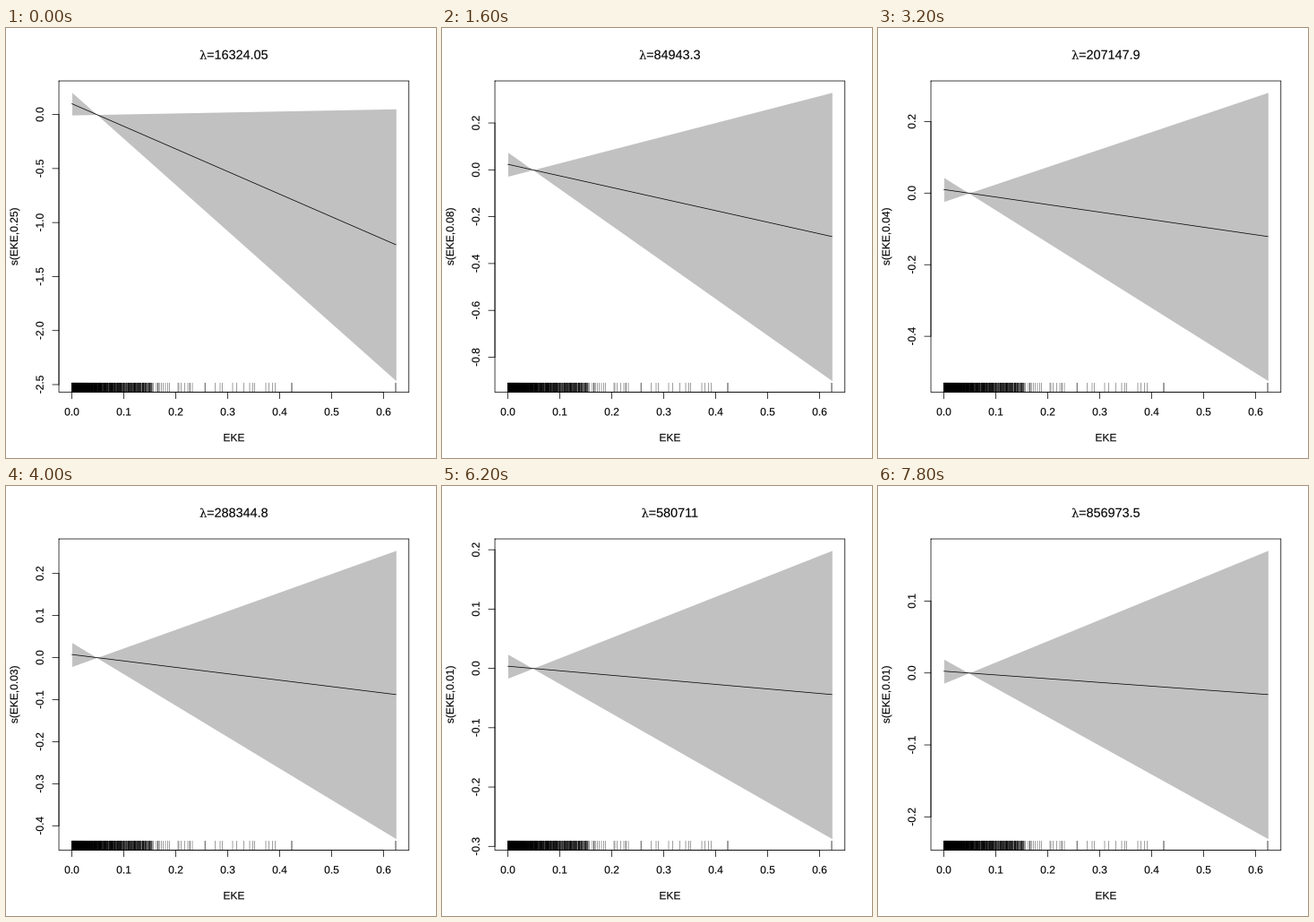
These frames come from a looping animation (480x480 px, 8000 ms). A matplotlib script:

```python
import math

import matplotlib.pyplot as plt
import numpy as np
from matplotlib.animation import FuncAnimation
from matplotlib.patches import PathPatch
from matplotlib.textpath import TextPath
from matplotlib.transforms import Affine2D

SIZE, DPI = 480, 100
FRAMES, INTERVAL = 40, 200
PX = 72 / DPI                       # points per pixel
STROKE = 0.75                       # line width in pixels
LINE = 14.4                         # height of one margin line
LEFT, RIGHT, TOP, BOTTOM = 59.04, 449.76, 59.04, 406.56
MID_X, MID_Y = (LEFT + RIGHT) / 2, (TOP + BOTTOM) / 2
X0, X1 = 73.51, 435.29              # data range inside the box
Y0, Y1 = 71.91, 393.69
X_UNIT = 580
PIVOT = 0.083                       # left / right distance from the zero point

plt.rcParams["path.snap"] = False
fig = plt.figure(figsize=(SIZE / DPI, SIZE / DPI), dpi=DPI, facecolor="white")
ax = fig.add_axes([0, 0, 1, 1])


def make_rug():
    rng = np.random.default_rng(4)
    dense = np.minimum(rng.exponential(17, 650), 96)
    middle = rng.triangular(10, 50, 94, 150)
    cluster = rng.uniform(68, 91, 35)
    sparse = [170, 171.5, 173.5, 175.5, 178, 180.5, 182.5, 192, 193, 195.5,
              199.5, 203, 205, 205.5, 208, 222, 222.3, 233.5, 239, 241.5,
              253, 257.5, 265.5, 272, 275.5, 277.5, 290, 293.5, 297.5,
              300.5, 318.8, 319.2, 434.7, 435.3]
    return np.concatenate([X0 + dense, X0 + middle, X0 + cluster, sparse])


RUG = make_rug()


def line(xs, ys):
    ax.plot(xs, ys, color="black", lw=STROKE * PX,
            solid_capstyle="round", solid_joinstyle="round")


def label(x, y, s, size=12, angle=0, family="Liberation Sans"):
    """Text centred on x, with its baseline through (x, y)."""
    path = TextPath((0, 0), s, size=size, prop={"family": family})
    width = text_width(s, size, family)
    place = Affine2D().translate(-width / 2, 0).scale(1, -1)
    place.rotate_deg(-angle).translate(x, y)
    ax.add_patch(PathPatch(place.transform_path(path), fc="black",
                           ec="black", lw=0.12 * PX))


def text_width(s, size, family):
    # Twin bars on both sides give the advance without side bearings.
    def extent(t):
        box = TextPath((0, 0), t, size=size, prop={"family": family}).get_extents()
        return box.width
    return extent("|" + s + "|") - extent("||")


def tick_step(span):
    """Round step giving about five intervals."""
    cell = span / 5
    base = 10 ** math.floor(math.log10(cell))
    unit = base
    for mult, bias in ((2, 0.8), (5, 1.7), (10, 0.8)):
        if mult * base - cell >= bias * (cell - unit):
            break
        unit = mult * base
    return unit


def fit(lam):
    """Right-end mean, right-end half width and degrees of freedom."""
    mean = -25870 / (lam + 6050 - 15e6 / lam)
    half = math.sqrt(34680 / (lam + 6900 - 21.5e6 / lam))
    edf = 7800 / (lam + 14876)
    return mean, half, edf


def draw_title(lam):
    num = f"={lam:.7g}"
    symbol = 7.9
    width = text_width(num, 14.4, "Liberation Sans")
    label(MID_X - width / 2, 34.7, "λ", 13, family="DejaVu Serif")
    label(MID_X + symbol / 2, 34.7, num, 14.4)


def draw_x_axis():
    ticks = [X0 + i * X_UNIT / 10 for i in range(7)]
    line([ticks[0], ticks[-1]], [BOTTOM, BOTTOM])
    for i, x in enumerate(ticks):
        line([x, x], [BOTTOM, BOTTOM + LINE / 2])
        label(x, BOTTOM + 1.8 * LINE, f"{i / 10:.1f}")
    label(MID_X, BOTTOM + 3.8 * LINE, "EKE")


def draw_y_axis(lo, hi, to_y):
    pad = 0.04 * (hi - lo)
    step = tick_step(hi - lo + 2 * pad)
    first, last = math.ceil((lo - pad) / step), math.floor((hi + pad) / step)
    line([LEFT, LEFT], [to_y(first * step), to_y(last * step)])
    for i in range(first, last + 1):
        y = to_y(i * step)
        line([LEFT - LINE / 2, LEFT], [y, y])
        label(LEFT - 1.2 * LINE, y, f"{i * step:.1f}", angle=90)


def update(k):
    lam = (127.765622 + 20.4605906 * k) ** 2
    mean, half, edf = fit(lam)
    right = np.array([mean + half, mean, mean - half])
    left = PIVOT * np.array([half - mean, -mean, -half - mean])
    hi, lo = max(right[0], left[0]), min(right[2], left[2])

    def to_y(v):
        return Y0 + (hi - v) * (Y1 - Y0) / (hi - lo)

    ax.clear()
    ax.axis("off")
    ax.set_xlim(0, SIZE)
    ax.set_ylim(SIZE, 0)

    pivot_x = X0 + (X1 - X0) * PIVOT / (1 + PIVOT)
    ax.fill_between([X0, pivot_x, X1],
                    to_y(np.array([left[0], 0, right[0]])),
                    to_y(np.array([left[2], 0, right[2]])),
                    color="#c1c1c1", lw=0)
    line([X0, X1], [to_y(left[1]), to_y(right[1])])
    ax.vlines(RUG, BOTTOM - 10.43, BOTTOM, color="black",
              lw=STROKE / 2 * PX, capstyle="round")

    line([LEFT, RIGHT, RIGHT, LEFT, LEFT], [TOP, TOP, BOTTOM, BOTTOM, TOP])
    draw_x_axis()
    draw_y_axis(lo, hi, to_y)
    label(LEFT - 3.2 * LINE, MID_Y, f"s(EKE,{round(edf, 2):g})", angle=90)
    draw_title(lam)
    return []


anim = FuncAnimation(fig, update, frames=FRAMES, interval=INTERVAL,
                     repeat=True, repeat_delay=0, blit=False)
plt.show()
```
